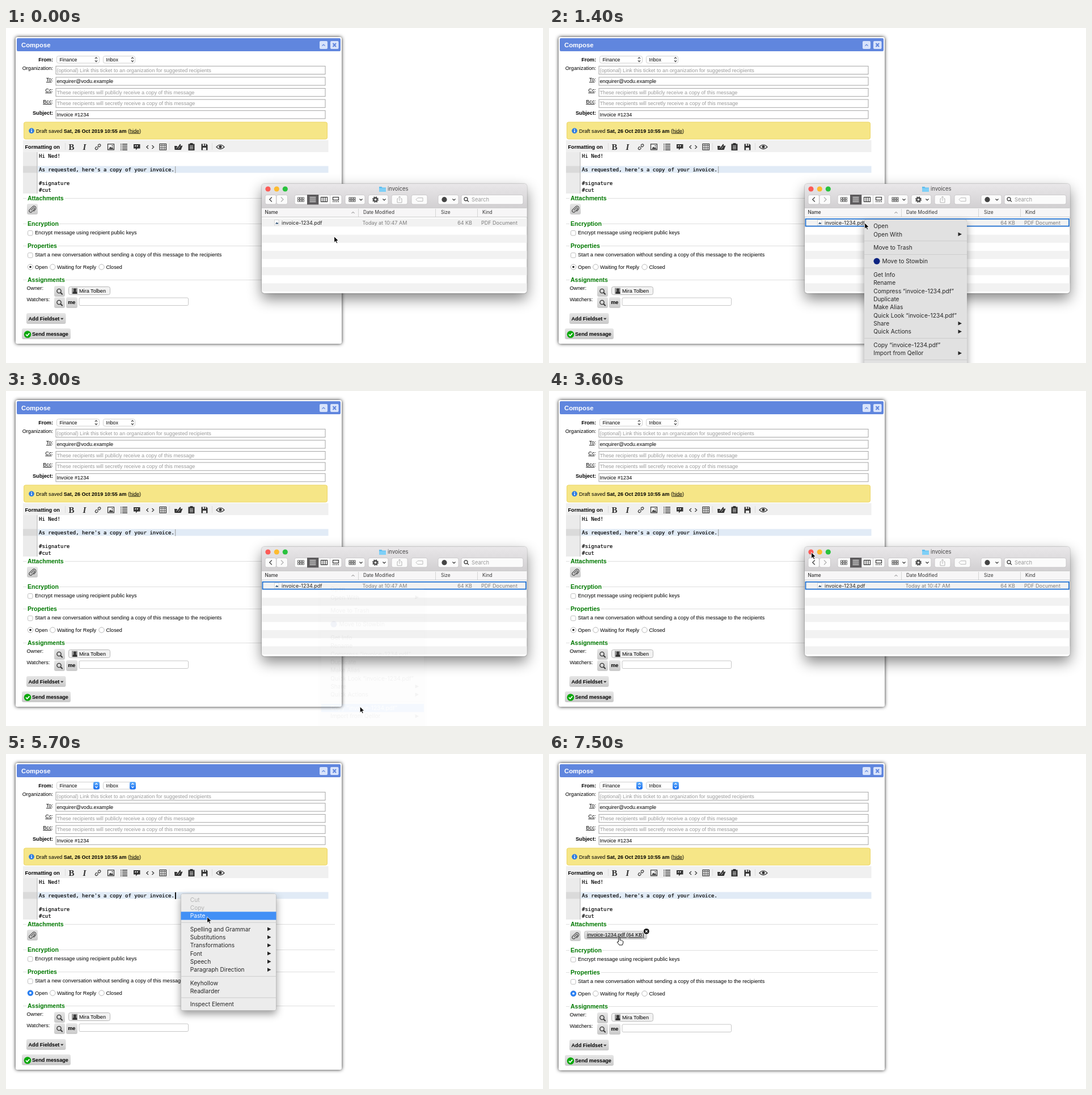
These frames come from a looping animation (947 px wide and 591 px high, 7.7 s). An HTML page:

```html
<!DOCTYPE html>
<html lang="en">
<head>
<meta charset="utf-8">
<title>Paste an attachment</title>
<style>
html, body { margin: 0; width: 100%; height: 100%; overflow: hidden; background: #fff; }
svg { display: block; width: 947px; height: 591px; font: 9.15px "Liberation Sans", Arial, sans-serif; }
text { white-space: pre; }
.b { font-weight: bold; }
.u { text-decoration: underline; }
.mono { font: 9.03px "DejaVu Sans Mono", monospace; stroke: #000; stroke-width: .2; }
.legend { font-weight: bold; font-size: 10.5px; fill: #007800; }
.serif { font-family: "Liberation Serif", serif; font-weight: bold; font-size: 15px; fill: #333; }
.ui { font: 9px Inter, sans-serif; }
.head { font-size: 8.3px; }
.title { font-size: 9.4px; }
.menu { font-size: 10.2px; }
.line { fill: none; stroke: #333; stroke-width: 1.2; }
.panel { filter: drop-shadow(0 0 3.2px #000d); }
.window { filter: drop-shadow(0 0 1px #0006) drop-shadow(0 10px 12px #0007); }
.popup { filter: drop-shadow(0 0 .6px #0008) drop-shadow(0 6px 7px #0006); }
</style>
</head>
<body>
<svg id="stage" viewBox="0 0 947 591">
  <defs>
    <linearGradient id="btn" x2="0" y2="1"><stop stop-color="#e6e6e6"/><stop offset="1" stop-color="#c9c9c9"/></linearGradient>
    <linearGradient id="bar" x2="0" y2="1"><stop stop-color="#e9e7e9"/><stop offset="1" stop-color="#d2d0d2"/></linearGradient>
    <linearGradient id="blue" x2="0" y2="1"><stop stop-color="#63aefa"/><stop offset="1" stop-color="#1a6ff0"/></linearGradient>
  </defs>
</svg>
<script>
const LOOP = 7700, STEP = 100;
const stage = document.getElementById('stage');

const text = (x, y, s, cls = '', extra = '') => `<text x="${x}" y="${y}" class="${cls}" ${extra}>${s}</text>`;
const rect = (x, y, w, h, fill, extra = '') => `<rect x="${x}" y="${y}" width="${w}" height="${h}" fill="${fill}" ${extra}/>`;
const circle = (x, y, r, fill, extra = '') => `<circle cx="${x}" cy="${y}" r="${r}" fill="${fill}" ${extra}/>`;
const path = (d, extra = 'class="line"') => `<path d="${d}" ${extra}/>`;
const fill = c => `fill="${c}"`;
const stroke = (c, w = 1) => `fill="none" stroke="${c}" stroke-width="${w}"`;
const group = (id, body) => `<g id="${id}">${body}</g>`;
const many = (list, fn) => list.map(fn).join('');

const button = (x, y, w, h = 19) => rect(x, y, w, h, 'url(#btn)', 'rx="3"');
const field = (x, y, w, h) => rect(x + .5, y + .5, w - 1, h - 1, '#fff', 'stroke="#a4a4a4"');
const lens = (x, y) => circle(x, y, 3.6, 'none', 'stroke="#333" stroke-width="1.4"') +
  path(`M${x + 2.7} ${y + 2.7}l3.4 3.4`, stroke('#333', 2));
const clip = (x, y, c) => path('M-2 3l4.6-4.6a1.5 1.5 0 0 1 2 2L-.6 5.6a2.6 2.6 0 0 1-3.8-3.6L1-3.4a3.4 3.4 0 0 1 5 4.8L2.6 4.8',
  `${stroke(c, 1.1)} transform="translate(${x - .6} ${y - .8})"`);
const updown = (x, y, c) => path(`M${x - 2} ${y - 1.5}l2-2.3 2 2.3M${x - 2} ${y + 1.5}l2 2.3 2-2.3`, stroke(c, 1.2));

function header() {
  const labels = [['From', 59, 'b'], ['Organization', 74], ['To', 94, 'u'], ['Cc', 113, 'u'], ['Bcc', 133, 'u'], ['Subject', 153, 'b']];
  const hint = fill('#9a9a9a');
  const inputs = ['(optional) Link this ticket to an organization for suggested recipients', 'enquirer@vodu.example',
    'These recipients will publicly receive a copy of this message',
    'These recipients will secretly receive a copy of this message', 'Invoice #1234'];
  const select = (x, w, s) => rect(x + .5, 49.5, w - 1, 12.5, '#fff', 'rx="3" stroke="#cfcfcf"') + text(x + 5.5, 58.7, s, '', 'font-size="8.7"');
  return rect(19, 18, 571, 23, '#6086de', 'rx="2"') +
    text(27, 34, 'Compose', 'b', 'fill="#fff" font-size="11.3"') +
    rect(553, 23, 14, 14, '#d8e3fb', 'rx="2"') + rect(572, 23, 14.5, 14, '#d8e3fb', 'rx="2"') +
    path('M557.5 31.5l2.5-2.5 2.5 2.5', stroke('#6086de', 1.2)) +
    path('M576.5 27l5.5 6m0-6l-5.5 6', stroke('#6086de', 2)) +
    many(labels, ([s, y, c]) => text(83, y, `<tspan class="${c || ''}">${s}</tspan><tspan class="${c == 'b' ? c : ''}">:</tspan>`, '', 'text-anchor="end"')) +
    select(89, 76, 'Finance') + select(171, 57, 'Inbox') +
    group('selectIdle', updown(159, 55.7, '#444') + updown(223, 55.7, '#444')) +
    group('selectFocus', many([154, 218], x => rect(x, 49, 11, 13.5, 'url(#blue)', 'rx="3"') + updown(x + 5.4, 55.7, '#fff'))) +
    many(inputs, (s, i) => field(87.5, 66.8 + i * 19.6, 476, 15.2) +
      text(89.5, 77.6 + i * 19.6, s, '', i == 1 || i == 4 ? '' : hint)) +
    rect(31.5, 166, 535, 30, '#f6e687', 'rx="3" stroke="#ecd568"') +
    circle(45, 181.3, 4.8, '#2c7be0') + rect(44.3, 180.5, 1.5, 3.5, '#fff') + circle(45, 178.8, .9, '#fff') +
    text(53, 184.5, 'Draft saved <tspan class="b">Sat, 26 Oct 2019 10:55 am</tspan> (<tspan class="u">hide</tspan>)', '', 'font-size="9.05"');
}

function toolbar() {
  return rect(30, 198, 538.5, 21, '#f0f0f0') + text(33.5, 212.6, 'Formatting on', 'b') +
    path('M104.5 203v12M288.5 203v12M363.5 203v12', stroke('#dcdcdc')) +
    text(110.5, 215, 'B', 'serif') + text(135.5, 215, 'I', 'serif', 'font-style="italic"') +
    path('M161 211l3-3M160 209l-2.3 2.3a2 2 0 0 0 2.8 2.8l2.2-2.2M161.6 207.4l2.1-2.1a2 2 0 0 1 2.8 2.8l-2.3 2.3') +
    rect(179.5, 204.8, 11, 10, 'none', 'class="line"') + path('M181 213.5l3-4 2 2 1.5-1.5 2 3.5z', fill('#333')) + circle(187.5, 207.8, 1, '#333') +
    many([205, 208.3, 211.6, 214.8], y => rect(202, y - .7, 1.6, 1.5, '#333') + rect(205, y - .7, 9, 1.5, '#333')) +
    path('M225 205h11.5v7.5h-5l-2.5 3v-3h-4z', fill('#333')) + path('M228 209.5v-2h1.5m2 2v-2h1.5', stroke('#fff', 1.2)) +
    path('M251 207l-3.2 3 3.2 3M257.5 207l3.2 3-3.2 3') +
    rect(271, 204.5, 11.5, 10.5, 'none', 'class="line"') + path('M271 207.5h11.5M271 211.3h11.5M275 205v10M279 205v10', stroke('#444', .9)) +
    path('M297 208h4l2 2 4-5.5 1.5 1.5-1 2 4-.5-3 7.5h-11z', fill('#333')) + path('M300 212l3-2m1 3l3-4', stroke('#eee', .8)) +
    path('M321.5 204.5h3v-1.5h5v1.5h3v11.5h-11z', fill('#333')) + path('M324 208h6m-6 2.5h6m-6 2.5h6', stroke('#eee')) +
    path('M344.5 204.5h9l2 2v9h-11z', fill('#333')) + rect(347, 204.5, 5.5, 3.5, '#f0f0f0') + rect(347, 211, 6, 4.5, '#f0f0f0') + path('M350 204v7', stroke('#333', 1.6)) +
    path('M371 210q7-8 14 0q-7 7-14 0z') + circle(378, 209.6, 2.5, '#333');
}

function editor() {
  const lines = ['Hi Ned!', '', "As requested, here's a copy of your invoice.", '', '#signature', '#cut'];
  return rect(30, 219, 25, 73, '#ebebeb') + rect(30, 243.5, 25, 12, '#dadada') + rect(54.5, 219, 1, 73, '#b0b0b0') +
    rect(56, 243.5, 512.5, 12, '#e1ebf6') + many(lines, (s, i) => text(58, 228.8 + i * 12, s, 'mono')) +
    rect(298.2, 244, 1, 12, '#999', 'id="caretIdle"') + rect(298, 244, 1.8, 12, '#000', 'id="caret"');
}

const fieldset = (s, y, w) => path(`M30 ${y}.5h6M${38 + w} ${y}.5H580`, stroke('#dedede')) + text(38, y + 4, s, 'legend');

function details() {
  const check = y => rect(38.5, y - 4, 8.5, 8.5, '#fff', 'rx="2" stroke="#bdbdbd"');
  const radio = x => circle(x, 421.6, 4.7, '#fff', 'stroke="#b5b5b5"');
  return button(37, 310, 19) + clip(46.5, 319.5, '#444') +
    fieldset('Encryption', 345, 56) + check(361.5) + text(51, 364.2, 'Encrypt message using recipient public keys') +
    fieldset('Properties', 384, 54) + check(400.7) +
    text(51, 403.4, 'Start a new conversation without sending a copy of this message to the recipients') +
    many([43, 82.3, 168.5], radio) +
    group('radioIdle', circle(43, 421.6, 1.8, '#222')) + group('radioFocus', circle(43, 421.6, 5.2, '#2a80f3') + circle(43, 421.6, 1.9, '#fff')) +
    text(51, 424.8, 'Open') + text(90, 424.8, 'Waiting for Reply') + text(176.5, 424.8, 'Closed') +
    fieldset('Assignments', 444, 67) + text(36.5, 462, 'Owner:') + text(36.5, 482, 'Watchers:') +
    button(85, 455, 19) + lens(93.5, 464) + button(85, 475, 19) + lens(93.5, 484) +
    rect(110.5, 456.5, 73, 14, '#f2f2f2', 'rx="3" stroke="#b8b8b8"') +
    rect(116, 458.5, 10, 10.5, '#999') + circle(121.5, 462, 2.4, '#333') + path('M117.5 469q0-5 4-5t4 5z', fill('#333')) +
    text(129, 466.5, 'Mira Tolben') +
    button(106, 475, 20) + text(109.2, 487, 'me', 'b') + rect(129, 476, 192.5, 13.5, '#fff', 'rx="2" stroke="#c6c6c6"') +
    button(36, 503, 69.5) + text(39.5, 515.8, 'Add Fieldset', 'b') + path('M96 511.8h5.5l-2.75 3z', fill('#333')) +
    button(28, 530, 86) + circle(38, 540.5, 6.3, '#0ba80b') + path('M35 540.5l2.3 2.5 4-4.6', stroke('#fff', 1.8)) +
    text(46, 543.3, 'Send message', 'b');
}

const attachment = () => rect(62.5, 312.5, 110, 14, 'url(#btn)', 'rx="3" stroke="#c2c2c2"') +
  text(67, 322.4, 'invoice-1234.pdf (64 KB)', '', 'id="fileLink"') +
  circle(171.8, 312.8, 4.9, '#111') + path('M169.9 310.9l3.8 3.8m0-3.8l-3.8 3.8', stroke('#fff', 1.3));

function finder() {
  const tool = (x, w) => rect(x, 294.5, w, 16.5, '#fbfbfb', 'rx="3" stroke="#c4c2c4" stroke-width=".8"');
  const chevron = x => path(`M${x - 2.5} 301.5l2.5 2.5 2.5-2.5`);
  const dots = (x, c) => many([0, 1, 2, 3, 4, 5], i => rect(x + i % 3 * 4, 299 + (i > 2) * 4.2, 3, 3, 'none', `stroke="${c}" stroke-width=".9"`));
  const grey = fill('#7d7d7d');
  return rect(451, 275, 467.5, 193, '#fff', 'rx="5" class="window"') +
    path('M451 317.5V280a5 5 0 0 1 5-5H913.5a5 5 0 0 1 5 5V317.5z', fill('url(#bar)')) +
    many([[462, '#fc5b57'], [477.3, '#fdbb2f'], [492.3, '#29c23e']], ([x, c]) => circle(x, 284, 4.6, c)) +
    path('M658 280h4.5l1 1.5h6.5v7.5h-12z', fill('#5fbdee')) + rect(658, 282.5, 12, 6.5, '#7fd0f7', 'rx=".6"') +
    text(673, 287.4, 'invoices', 'title', fill('#444')) +
    tool(457, 19.5) + tool(477, 19.5) + path('M468.8 298.5l-4 4 4 4', stroke('#444', 1.3)) + path('M485 298.5l4 4-4 4', stroke('#b0b0b0', 1.3)) +
    tool(509, 83) + rect(531, 294, 20.3, 17.5, '#5d5b5d') + path('M571.5 295v16', stroke('#d5d5d5')) +
    dots(514.5, '#555') + path('M535.5 298.5h11m-11 2.7h11m-11 2.7h11m-11 2.7h11', stroke('#fff')) +
    rect(555.5, 298.5, 11, 8, 'none', 'class="line"') + path('M559.2 298.5v8m3.7-8v8') +
    rect(576.5, 298.5, 10, 5, 'none', 'class="line"') + path('M576 306.3h11', 'class="line" stroke-dasharray="2 1"') +
    tool(598, 35) + dots(605, '#444') + chevron(626) +
    tool(639, 35) + circle(651.5, 302.7, 3, 'none', 'stroke="#444" stroke-width="2.2"') +
    circle(651.5, 302.7, 4.8, 'none', 'stroke="#444" stroke-width="1.6" stroke-dasharray="1.9 1.87"') + chevron(667) +
    tool(680, 28) + path('M692 301h-2v7h8v-7h-2M694 305v-8m-2 2l2-2 2 2', stroke('#b4b4b4')) +
    tool(715, 28) + path('M723 302.7l3-3h9v6h-9z', stroke('#bbb')) +
    tool(762, 36) + circle(773, 302.7, 4.6, '#444') + chevron(790) +
    tool(803, 109) + circle(811, 301.8, 3, 'none', 'class="line"') + path('M813.3 304l2.7 2.7') +
    text(821, 306, 'Search', 'title', fill('#999')) +
    rect(451, 317, 467.5, 16.5, '#f7f6f7') + path('M451 317.5h467.5M451 333.5h467.5', stroke('#cbcbcb')) +
    path('M621.5 319v14M757.5 319v14M831.5 319v14', stroke('#d4d4d4')) + path('M609.5 327l2.5-2.5 2.5 2.5', stroke('#777')) +
    many([['Name', 456.5], ['Date Modified', 630], ['Size', 767], ['Kind', 840]], ([s, x], i) => text(x, 328.3, s, 'head', `fill="#333" font-weight="${i ? 400 : 500}"`)) +
    many([0, 1, 2, 3, 4], i => rect(451, 336 + i * 28.6, 467.5, 14.3, '#f2f2f2')) +
    rect(473.5, 338.7, 7.5, 9.3, '#fff', 'stroke="#ccc" stroke-width=".8"') + path('M475 346l2-4 1.5 2 1.5-1v3z', fill('#54708c')) +
    text(486, 346.5, 'invoice-1234.pdf', '', fill('#222')) + text(628.5, 346.5, 'Today at 10:47 AM', '', grey) +
    text(822, 346.5, '64 KB', '', grey + ' text-anchor="end"') + text(838, 346.5, 'PDF Document', '', grey) +
    rect(452.5, 336.8, 464.5, 12.8, 'none', 'id="rowRing" stroke="#1e6fd0" stroke-width="1.8"');
}

// Item markers: "-" separator, trailing ">" submenu, leading "!" disabled, leading "@" with app icon.
const ROW = 14.35;
const menus = {
  fileMenu: { x: 556, y: 338, w: 181, h: 280, top: 342.3, gap: 9.4, color: '#e1e1e1', items: ['Open', 'Open With>', '-', 'Move to Trash', '-', '@Move to Stowbin', '-',
    'Get Info', 'Rename', 'Compress “invoice-1234.pdf”', 'Duplicate', 'Make Alias', 'Quick Look “invoice-1234.pdf”', 'Share>', 'Quick Actions>', '-',
    'Copy “invoice-1234.pdf”', 'Import from Qellor>', '-'] },
  editMenu: { x: 308.5, y: 246.5, w: 168, h: 206, top: 249.6, gap: 9, color: '#ececec', items: ['!Cut', '!Copy', 'Paste', '-', 'Spelling and Grammar>', 'Substitutions>',
    'Transformations>', 'Font>', 'Speech>', 'Paragraph Direction>', '-', 'Keyhollow', 'Readlarder', '-', 'Inspect Element'] }
};

function menu(id) {
  const m = menus[id];
  let y = m.top;
  m.rows = [];
  const body = many(m.items, item => {
    const at = y;
    if (item == '-') {
      y += m.gap;
      return rect(m.x, at + m.gap / 2 - .5, m.w, 1, '#cdcdcd');
    }
    y += ROW;
    const icon = item[0] == '@', off = item[0] == '!', label = item.replace(/^[@!]|>$/g, '');
    if (!off) m.rows.push(at);
    return group(off ? '' : id + at, rect(m.x, at, m.w, ROW, '#4290f6', 'opacity="0"') +
      (icon ? circle(m.x + 22, at + 7.2, 5.6, '#0d2481') : '') +
      text(m.x + (icon ? 31.5 : 16.2), at + 10.9, label, '', off ? fill('#b3b3b3') : fill('#262626')) +
      (item.endsWith('>') ? path(`M${m.x + m.w - 15.5} ${at + 3.8}l6.5 3.4-6.5 3.4z`, fill('#262626')) : ''));
  });
  return `<g id="${id}" class="menu">` + rect(m.x, m.y, m.w, m.h, m.color, 'rx="4" class="popup"') + body + '</g>';
}

const cursors = () => group('arrow', path('M.7.7V11.5L3.2 9.2 4.8 13 6.7 12.2 5.1 8.5H8.5Z', 'fill="#000" stroke="#fff" stroke-width=".9"')) +
  group('beam', path('M-2.5-5.5q2.5 0 2.5 1.5V4q0 1.5-2.5 1.5M2.5-5.5q-2.5 0-2.5 1.5M0 4q0 1.5 2.5 1.5M-1.3 1.5h2.6', stroke('#000', 1))) +
  group('hand', path('M-.8 8V1.4a1.2 1.2 0 0 1 2.4 0V5q1.8-.6 2.2.5 1.6-.4 2 .7 1.6 0 1.6 1.5-.1 3-1.6 5.8H.5L-3.3 8.6q.5-1.8 2.5-.6z', 'fill="#fff" stroke="#000" stroke-width=".95"'));

stage.innerHTML += rect(17, 16, 575, 541, '#fff', 'id="panel" class="panel" rx="3"') +
  header() + toolbar() + editor() + fieldset('Attachments', 300, 66) + group('details', details()) +
  group('attachment', attachment()) +
  `<g class="ui">${group('finder', finder())}${menu('fileMenu')}${menu('editMenu')}</g>` + group('cursor', cursors());

const el = id => document.getElementById(id);
const show = (id, on) => el(id).setAttribute('opacity', +on);
const within = (v, a, b) => v >= a && v < b;

const route = [[100, 578, 367], [500, 560, 347], [800, 560, 347], [1000, 556, 343], [1500, 556, 343], [2200, 622, 553], [2300, 622, 553],
  [2700, 623.5, 556], [3000, 623.5, 556], [3600, 462, 284], [3900, 462, 284], [4300, 308, 250], [4900, 308, 250],
  [5500, 354, 286.5], [6000, 354, 286.5], [6900, 123.5, 323.5]];

function pointer(t) {
  const i = route.findIndex(p => p[0] > t);
  if (i < 1) return (i ? route[route.length - 1] : route[0]).slice(1);
  const [a, x0, y0] = route[i - 1], [b, x1, y1] = route[i];
  const p = (t - a) / (b - a), e = p * p * (3 - 2 * p);
  return [x0 + (x1 - x0) * e, y0 + (y1 - y0) * e];
}

function drawMenu(id, t, open, close, blink, x, y) {
  const m = menus[id];
  show(id, t < open ? 0 : t < close ? 1 : t < close + 100 ? .45 : t < close + 200 ? .05 : 0);
  for (const at of m.rows) {
    const lit = t != blink && x > m.x + 1 && within(y, at, at + ROW);
    const [bg, ...parts] = el(id + at).children;
    bg.setAttribute('opacity', +lit);
    for (const part of parts) if (part.tagName != 'circle') part.setAttribute('fill', lit ? '#fff' : '#262626');
  }
}

function draw(t) {
  const [x, y] = pointer(t);
  const focus = t >= 3800, attached = t >= 6200;
  for (const id of ['selectFocus', 'radioFocus']) show(id, focus);
  for (const id of ['selectIdle', 'radioIdle', 'caretIdle', 'finder']) show(id, !focus);
  show('caret', focus && !within(t, 6300, 6800) && t < 7300);
  show('rowRing', t >= 1200);
  show('attachment', attached);
  el('panel').setAttribute('height', 541 + attached);
  el('details').setAttribute('transform', `translate(0 ${+attached})`);

  drawMenu('fileMenu', t, 1200, 2900, 2700, x, y);
  // The pasted row stays lit while the menu fades, even though the pointer leaves it.
  drawMenu('editMenu', t, 4800, 6000, 5800, ...(t < 6000 ? [x, y] : [354, 286.5]));

  const hover = attached && within(x, 62, 173) && within(y, 312, 327);
  const typing = focus && !within(t, 4800, 6000) && within(x, 56, 568) && within(y, 219, 292);
  el('fileLink').setAttribute('class', hover ? 'u' : '');
  show('hand', hover);
  show('beam', typing);
  show('arrow', !hover && !typing);
  el('cursor').setAttribute('transform', `translate(${x} ${y})`);
}

const start = performance.now();
function tick() {
  const t = (performance.now() - start) % LOOP;
  draw(Math.floor(t / STEP) * STEP);
  requestAnimationFrame(tick);
}
tick();
</script>
</body>
</html>
```
